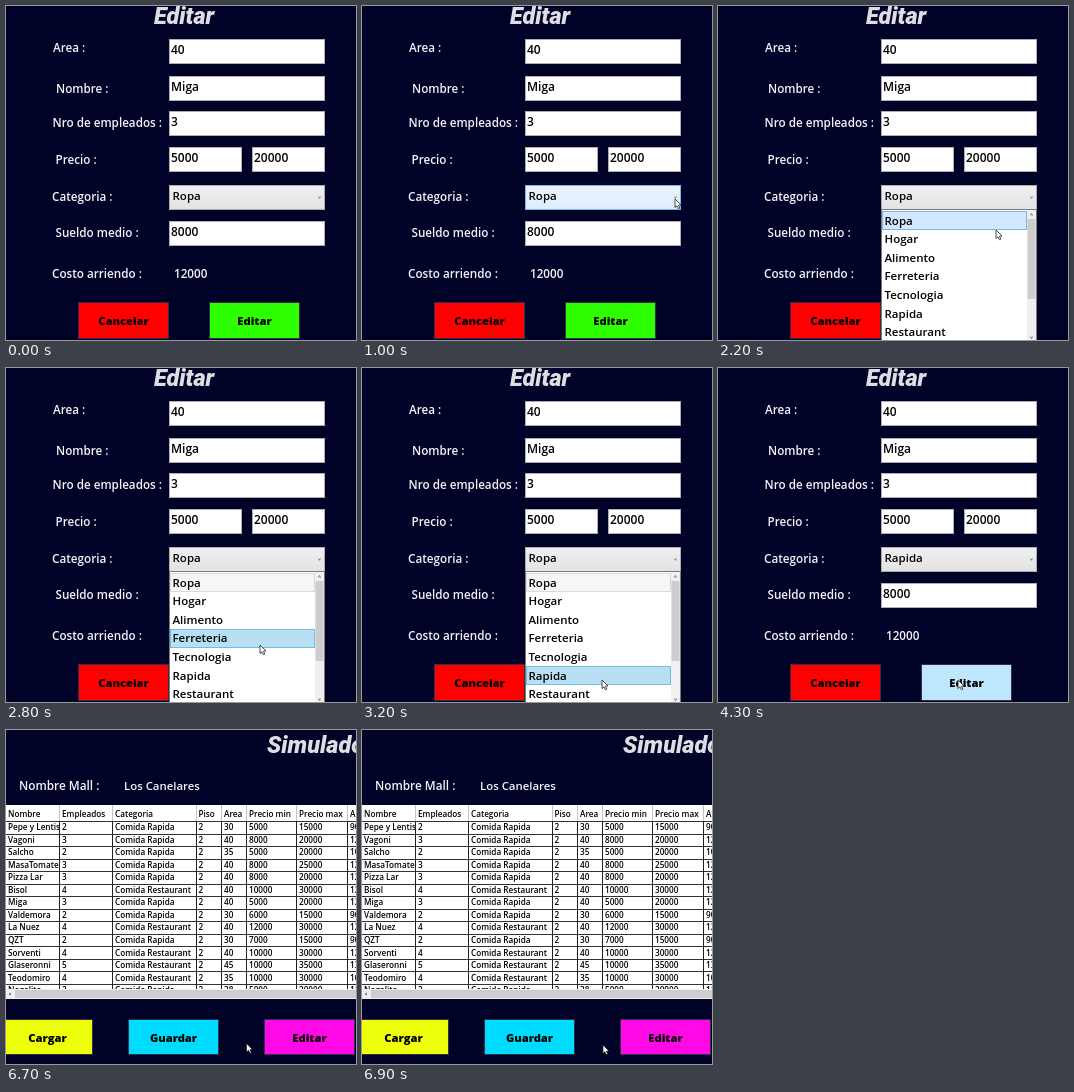
An HTML page with a canvas that plays this animation: 350x334 px, repeating every 7.8 s.

```html
<!DOCTYPE html>
<html lang="es">
<head>
<meta charset="utf-8">
<title>Editar local</title>
<style>
html, body { margin: 0; width: 100%; height: 100%; overflow: hidden; background: #010228; }
canvas { display: block; }
</style>
</head>
<body>
<canvas id="stage" width="350" height="334"></canvas>
<script>
const ctx = document.getElementById('stage').getContext('2d');
const LOOP = 7800, OPEN = 1200, PICK = 4300, PRESS = 6500, CLOSE = 6600;
const SANS = '"Open Sans", "Noto Sans", sans-serif';
const ITEMS = ['Ropa', 'Hogar', 'Alimento', 'Ferreteria', 'Tecnologia', 'Rapida', 'Restaurant'];
const ROW = 18.6, LIST_TOP = 205;

// Pointer path: time, x, y
const PATH = [
  [300, 345, 322], [1000, 313, 193], [1600, 313, 193], [2200, 278, 224],
  [2400, 270, 231], [2800, 254, 277], [3200, 240, 312], [6500, 240, 312], [6900, 241, 315]
];

const HEADS = ['Nombre', 'Empleados', 'Categoria', 'Piso', 'Area', 'Precio min', 'Precio max', 'Arriendo'];
const COLS = [0, 54, 107, 190.5, 216, 241, 291, 342, 400];
// Name, staff, area, lowest and highest price in thousands
const SHOPS = [
  ['Pepe y Lentisco', 2, 30, 5, 15], ['Vagoni', 3, 40, 8, 20], ['Salcho', 2, 35, 5, 20],
  ['MasaTomate', 3, 40, 8, 25], ['Pizza Lar', 3, 40, 8, 20], ['Bisol', 4, 40, 10, 30],
  ['Miga', 3, 40, 5, 20], ['Valdemora', 2, 30, 6, 15], ['La Nuez', 4, 40, 12, 30],
  ['QZT', 2, 30, 7, 15], ['Sorventi', 4, 40, 10, 30], ['Glaseronni', 5, 45, 10, 35],
  ['Teodomiro', 4, 35, 10, 30], ['Nogalito', 3, 38, 5, 20]
];

function rect(x, y, w, h, fill, border) {
  ctx.fillStyle = fill;
  ctx.fillRect(x, y, w, h);
  if (border) {
    ctx.strokeStyle = border;
    ctx.lineWidth = 1;
    ctx.strokeRect(x + .5, y + .5, w - 1, h - 1);
  }
}

function text(str, x, y, size = 11.7, color = '#000', weight = 600, align = 'left') {
  ctx.font = `${weight} ${size}px ${SANS}`;
  ctx.fillStyle = color;
  ctx.textAlign = align;
  ctx.fillText(str, x, y);
}

function title(str, x, y) {
  ctx.font = 'italic 900 23.5px Roboto, sans-serif';
  ctx.fillStyle = '#dedee2';
  ctx.textAlign = 'left';
  ctx.fillText(str, x, y);
}

function clipTo(x, y, w, h, draw) {
  ctx.save();
  ctx.beginPath();
  ctx.rect(x, y, w, h);
  ctx.clip();
  draw();
  ctx.restore();
}

function button(label, x, y, h, fill) {
  rect(x, y, 91, h, fill, '#30304a');
  text(label, x + 45.5, y + h / 2 + 4.5, 11.2, '#000', 800, 'center');
}

function field(str, x, y, w) {
  rect(x, y, w, 25, '#fff', '#abadb3');
  text(str, x + 2, y + 14.5, 12);
}

function chevron(x, y, dx, dy) {
  ctx.strokeStyle = '#707070';
  ctx.lineWidth = 1;
  ctx.beginPath();
  ctx.moveTo(x - dx - dy, y - dy - dx);
  ctx.lineTo(x + dx, y + dy);
  ctx.lineTo(x - dx + dy, y - dy + dx);
  ctx.stroke();
}

function pointer(t) {
  const i = PATH.findIndex(p => p[0] > t);
  if (i === 0) return null;
  if (i < 0) return PATH[PATH.length - 1].slice(1);
  const [a, b] = [PATH[i - 1], PATH[i]], k = (t - a[0]) / (b[0] - a[0]);
  return [a[1] + (b[1] - a[1]) * k, a[2] + (b[2] - a[2]) * k];
}

function drawPointer([x, y]) {
  ctx.save();
  ctx.translate(x, y);
  ctx.beginPath();
  [[0, 0], [0, 8.5], [2, 6.8], [3.4, 9.8], [4.8, 9.1], [3.5, 6.2], [6, 6]].forEach(p => ctx.lineTo(...p));
  ctx.closePath();
  ctx.fillStyle = '#fff';
  ctx.fill();
  ctx.strokeStyle = '#222';
  ctx.lineWidth = .8;
  ctx.stroke();
  ctx.restore();
}

function drawCombo(value, hover) {
  const g = ctx.createLinearGradient(0, 179, 0, 204);
  g.addColorStop(0, hover ? '#ecf4fc' : '#f0f0f0');
  g.addColorStop(1, hover ? '#dcecfc' : '#e2e2e2');
  rect(163, 179, 156, 25, g, hover ? '#7eb4ea' : '#acacac');
  text(value, 166.5, 194, 11.5);
  chevron(313.5, 191.5, 0, .8);
}

function drawList(t, y) {
  const shown = t < OPEN + 100 ? .6 : 1;
  const active = Math.max(0, Math.floor((y - LIST_TOP - .5) / ROW));
  clipTo(163, 203, 156, 131 * shown, () => {
    ctx.translate(0, (shown - 1) * 131);
    rect(163, 203, 156, 140, '#fff', '#7a7a7a');
    ITEMS.forEach((item, i) => {
      const top = LIST_TOP + i * ROW;
      if (i === active) rect(164, Math.round(top), 145, 19, i ? '#b8dff2' : '#d1e8ff', i ? '#6fbfe5' : '#7ab5ec');
      else if (i === 0) rect(164, top, 145, 19, '#f6f6f6', '#dadada');
      text(item, 166.5, top + 13.5, 11.5);
    });
    rect(309, 204, 9, 140, '#f0f0f0');
    rect(309.5, 213, 8, 80, '#cdcdcd');
    chevron(313.5, 208.5, 0, -1);
    chevron(313.5, 331.5, 0, 1);
  });
}

function drawForm(t, pos) {
  const [x, y] = pos || [0, 0];
  const picked = t >= PICK;
  title('Editar', 148, 17.5);
  [['Area :', 47, 46], ['Nombre :', 50, 87], ['Nro de empleados :', 46.5, 121],
   ['Precio :', 49.5, 158], ['Categoria :', 46, 195], ['Sueldo medio :', 49.5, 231],
   ['Costo arriendo :', 46, 272], ['12000', 168, 272]]
    .forEach(([s, lx, ly]) => text(s, lx, ly, 11.7, '#f4f4f8'));
  field('40', 163, 33, 156);
  field('Miga', 163, 70, 156);
  field('3', 163, 105, 156);
  field('5000', 163, 141, 73);
  field('20000', 246, 141, 73);
  field('8000', 163, 215, 156);
  drawCombo(picked ? 'Rapida' : 'Ropa', x > 163 && x < 319 && y > 179 && y < 204);
  button('Cancelar', 72, 296, 37, '#ff0000');
  button('Editar', 203, 296, 37, t >= PRESS ? '#c4e5f6' : picked ? '#bee6fd' : '#2dff00');
  if (t >= OPEN && !picked) drawList(t, y);
}

function drawTable() {
  rect(0, 75, 350, 194, '#fff');
  const cell = (str, c, y) =>
    clipTo(COLS[c], 75, COLS[c + 1] - COLS[c] - 1, 184, () => text(str, COLS[c] + 2, y, 8.2));
  HEADS.forEach((head, c) => cell(head, c, 86.5));
  SHOPS.forEach(([name, staff, area, low, high], i) => {
    const kind = 'Comida ' + (staff > 3 ? 'Restaurant' : 'Rapida');
    [name, staff, kind, 2, area, low * 1000, high * 1000, area * 300]
      .forEach((v, c) => cell(v, c, 100.3 + i * 12.52));
    rect(0, Math.round(91 + i * 12.52), 350, 1, '#333');
  });
  COLS.slice(1, -1).forEach(x => {
    rect(Math.round(x) - 1, 75, 1, 16, '#c4c4c4');
    rect(Math.round(x) - 1, 91, 1, 168, '#222');
  });
  rect(0, 259, 350, 10, '#f0f0f0');
  rect(9, 260, 341, 8, '#cdcdcd');
  chevron(4, 264, -1, 0);
}

function drawMain() {
  title('Simulador', 261, 22.5);
  text('Nombre Mall :', 13, 60, 11.8, '#f4f4f8');
  text('Los Canelares', 118, 60, 11.4, '#f4f4f8');
  drawTable();
  button('Cargar', -4, 289, 36, '#edff0a');
  button('Guardar', 122, 289, 36, '#00dcff');
  button('Editar', 258, 289, 36, '#ff0ae6');
}

function frame(now) {
  const t = Math.floor(now % LOOP / 100) * 100;
  const pos = pointer(t);
  rect(0, 0, 350, 334, '#010228');
  if (t < CLOSE) drawForm(t, pos);
  else drawMain();
  if (pos) drawPointer(pos);
  requestAnimationFrame(frame);
}
requestAnimationFrame(frame);
</script>
</body>
</html>
```
